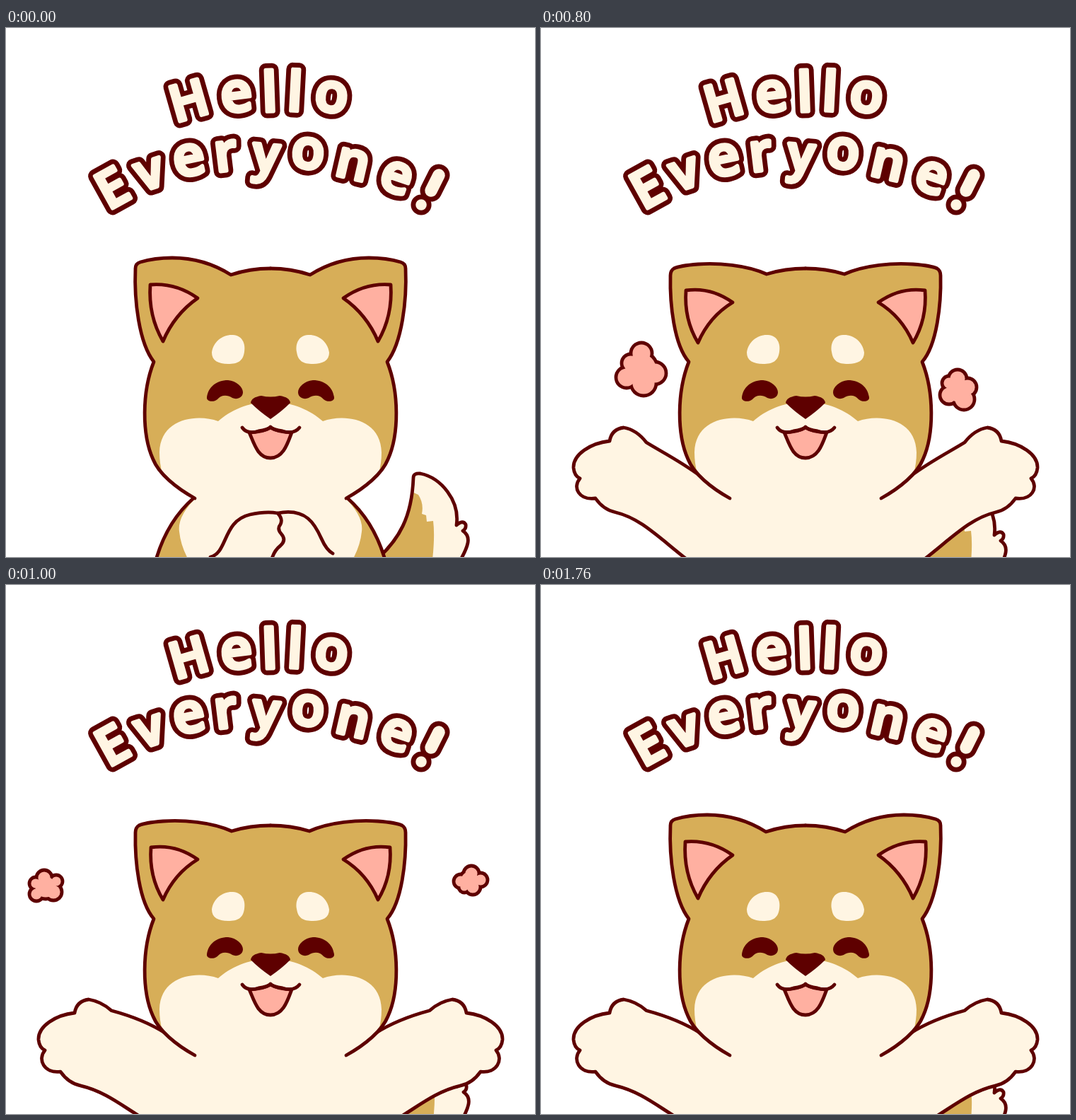
An HTML page with a canvas that plays this animation: 748x748 px, repeating every 2 s.

```html
<!DOCTYPE html>
<html lang="en">
<head>
<meta charset="utf-8">
<title>Hello Everyone!</title>
<style>
html, body { margin: 0; width: 100%; height: 100%; overflow: hidden; background: #fff; }
canvas { display: block; width: 100%; height: 100%; }
</style>
</head>
<body>
<canvas id="stage" width="748" height="748"></canvas>
<script>
const SIZE = 748, LOOP = 2000;
const TAN = '#d7ae58', CREAM = '#fff5e3', DARK = '#5e0000', PINK = '#ffb0a1';
const ctx = document.getElementById('stage').getContext('2d');

function fill(d, color) {
  ctx.fillStyle = color;
  ctx.fill(new Path2D(d));
}

function line(d, width = 4.8, color = DARK) {
  ctx.strokeStyle = color;
  ctx.lineWidth = width;
  ctx.stroke(new Path2D(d));
}

function mirrored(draw) {
  draw();
  ctx.save();
  ctx.translate(SIZE, 0);
  ctx.scale(-1, 1);
  draw();
  ctx.restore();
}

function clipped(d, draw) {
  ctx.save();
  ctx.clip(new Path2D(d));
  draw();
  ctx.restore();
}

// Lettering: character, ink centre, tilt in degrees, font size
const LETTERS = [
  ['H', 258, 102, -16, 71], ['e', 326, 97, -7, 78], ['l', 373, 89, -2, 77],
  ['l', 409, 88, 3, 77], ['o', 460, 98, 7, 77],
  ['E', 151, 225, -29, 73], ['v', 204, 207, -18, 72], ['e', 259, 187, -12, 78],
  ['r', 313, 181, -7, 75], ['y', 367, 192, 5, 70], ['o', 427, 178, 5, 77],
  ['n', 490, 193, 13, 73], ['e', 552, 212, 19, 76]
];

function letter([char, x, y, tilt, size], color, width) {
  ctx.save();
  ctx.translate(x, y);
  ctx.rotate(tilt * Math.PI / 180);
  ctx.font = `600 ${size}px "Open Sans", "Noto Sans", sans-serif`;
  const m = ctx.measureText(char);
  const dx = (m.actualBoundingBoxLeft - m.actualBoundingBoxRight) / 2;
  const dy = (m.actualBoundingBoxAscent - m.actualBoundingBoxDescent) / 2;
  ctx.fillStyle = ctx.strokeStyle = color;
  ctx.lineWidth = width;
  ctx.strokeText(char, dx, dy);
  ctx.fillText(char, dx, dy);
  ctx.restore();
}

function greeting() {
  for (const [color, width] of [[DARK, 19], [CREAM, 5.5]]) {
    LETTERS.forEach(l => letter(l, color, width));
    // exclamation mark
    line('M612 208L601 230', width + 12, color);
    line('M587 250h.1', width + 10, color);
  }
}

const TAIL = 'M520 755C557 724 574 690 576 636Q576 629 586 630C615 636 642 668 637 703' +
  'Q646 695 650 702Q651 708 646 711Q655 717 653 728Q651 738 641 755';
const TAIL_TIP = 'M570 654L583 660Q591 672 588 687L594 689L595 698L604 697Q607 720 602 760H670V615H570Z';

function tail([dx, dy]) {
  ctx.save();
  ctx.translate(dx, dy);
  fill(TAIL, TAN);
  clipped(TAIL, () => fill(TAIL_TIP, CREAM));
  line(TAIL);
  ctx.restore();
}

const LOW_HANDS = 'M289 748C314 742 306 697 345 688Q368 683 384 686C425 678 437 702 446 722Q453 738 462 743' +
  'M384 686Q392 694 388 702Q383 708 389 715Q397 724 388 732Q380 738 376 750';
const HIGH_HANDS = 'M262 745C314 746 304 708 326 692Q346 676 384 680C430 681 434 705 445 723Q456 743 488 745' +
  'M384 680Q392 690 388 698Q385 704 390 712Q397 721 389 731Q382 736 377 742';

function sitting(hands) {
  mirrored(() => {
    const side = 'M266 664Q228 697 212 752';
    fill(side + 'H374V660Z', TAN);
    fill('M270 663Q242 690 245 712Q247 732 258 752H374V660Z', CREAM);
    line(side);
  });
  line(hands);
}

// drop lowers the paws
function openArms(drop) {
  const y = (base, k = 1) => base + drop * k;
  const arm = `M226 634C198 ${y(613, .15)} 170 ${y(599, .4)} 149 ${y(586, .75)}` +
    `Q135 ${y(568)} 117 ${y(565)}Q100 ${y(567)} 97 ${y(584)}` +
    `C70 ${y(587)} 45 ${y(603)} 46 ${y(622)}Q47 ${y(633)} 55 ${y(637)}` +
    `C44 ${y(650)} 54 ${y(668, 1.1)} 77 ${y(665, 1.1)}C86 ${y(678, 1.1)} 96 ${y(683, 1.1)} 106 ${y(685, 1.1)}` +
    `C140 ${y(693, 1.1)} 165 ${y(719, .85)} ${y(207, -.8)} 752`;
  mirrored(() => {
    fill(arm + 'H374V632Z', CREAM);
    line(arm);
  });
}

const EARS_UP = {
  crown: 'M374 340Q345 340 318 349Q280 325 235 325C215 325 200 328 190 331Q183 333 183 340C181 385 188 445 209 472',
  inner: 'M204 363Q240 360 271 382Q238 405 222 443Q201 407 204 363Z'
};
const EARS_DOWN = {
  crown: 'M374 340Q345 340 319 348C290 335 250 332 222 334Q196 336 188 340Q183 343 183 350C182 390 188 448 209 472',
  inner: 'M205 371Q240 366 271 388Q238 408 222 445Q202 412 205 371Z'
};

function head(ears) {
  const half = ears.crown + 'C192 515 192 575 208 610C216 630 240 650 267 665';
  mirrored(() => {
    const shape = half + 'H374Z';
    fill(shape, TAN);
    clipped(shape, () =>
      fill('M374 529C345 528 318 540 300 556C270 545 218 552 217 600Q217 615 221 630Q240 655 266 670H374Z', CREAM));
    line(half);
    fill(ears.inner, PINK);
    line(ears.inner);
    // brow and eye
    fill('M291 459C293 443 307 433 321 434C334 435 339 446 337 458C335 471 328 475 314 475C300 475 291 470 291 459Z', CREAM);
    fill('M284 522C286 508 297 498 314 498C326 499 335 508 335 515C335 523 326 526 320 523' +
      'C312 518 304 519 299 525C293 530 283 528 284 522Z', DARK);
  });
  fill('M346 530Q347 522 361 520Q374 523 387 520Q401 522 402 530Q390 542 374 553Q358 542 346 530Z', DARK);
  const tongue = 'M344 572Q362 572 374 565Q386 572 404 572C398 588 392 608 374 608C356 608 351 588 344 572Z';
  fill(tongue, PINK);
  line(tongue);
  line('M334 565Q341 575 357 570Q371 568 374 564Q377 568 391 570Q407 575 415 565');
}

// Each puff is a union of circles: x, y, radius
function puff(bumps) {
  for (const [color, grow] of [[DARK, 2.4], [PINK, -2.4]]) {
    ctx.fillStyle = color;
    for (const [x, y, r] of bumps) {
      ctx.beginPath();
      ctx.arc(x, y, r + grow, 0, 2 * Math.PI);
      ctx.fill();
    }
  }
}

const BURST = [
  [[142, 460, 15], [127, 474, 13], [161, 488, 16], [145, 502, 18], [121, 494, 15], [141, 482, 24]],
  [[589, 496, 13], [603, 508, 13], [598, 525, 15], [577, 519, 13], [577, 502, 10], [590, 512, 19]]
];
const DRIFT = [
  [[54, 414, 11], [71, 419, 9], [67, 434, 12], [43, 437, 10], [42, 422, 9], [56, 427, 17]],
  [[658, 408, 11], [671, 417, 10], [660, 427, 11], [643, 419, 10], [648, 427, 8], [656, 418, 15]]
];
const LEAVE = [
  [[14, 525, 10], [19, 534, 10], [12, 537, 9], [2, 532, 11]],
  [[746, 496, 10], [743, 508, 9], [750, 518, 10], [754, 507, 14]]
];

const POSES = [
  { until: 600, ears: EARS_UP, hands: LOW_HANDS, tail: [0, 0] },
  { until: 800, ears: EARS_UP, hands: HIGH_HANDS, tail: [0, 0] },
  { until: 1000, ears: EARS_DOWN, drop: 0, tail: [4, 14], puffs: BURST },
  { until: 1200, ears: EARS_DOWN, drop: 21, tail: [1, 6], puffs: DRIFT },
  { until: 1400, ears: EARS_UP, drop: 21, tail: [4, 15], puffs: LEAVE },
  { until: LOOP, ears: EARS_UP, drop: 21, tail: [4, 15] }
];

function draw(pose) {
  ctx.fillStyle = '#fff';
  ctx.fillRect(0, 0, SIZE, SIZE);
  ctx.lineCap = ctx.lineJoin = 'round';
  greeting();
  tail(pose.tail);
  if (pose.hands) sitting(pose.hands);
  else openArms(pose.drop);
  head(pose.ears);
  (pose.puffs || []).forEach(puff);
}

const start = performance.now();
function tick() {
  const t = (performance.now() - start) % LOOP;
  draw(POSES.find(p => t < p.until));
  requestAnimationFrame(tick);
}
tick();
</script>
</body>
</html>
```
